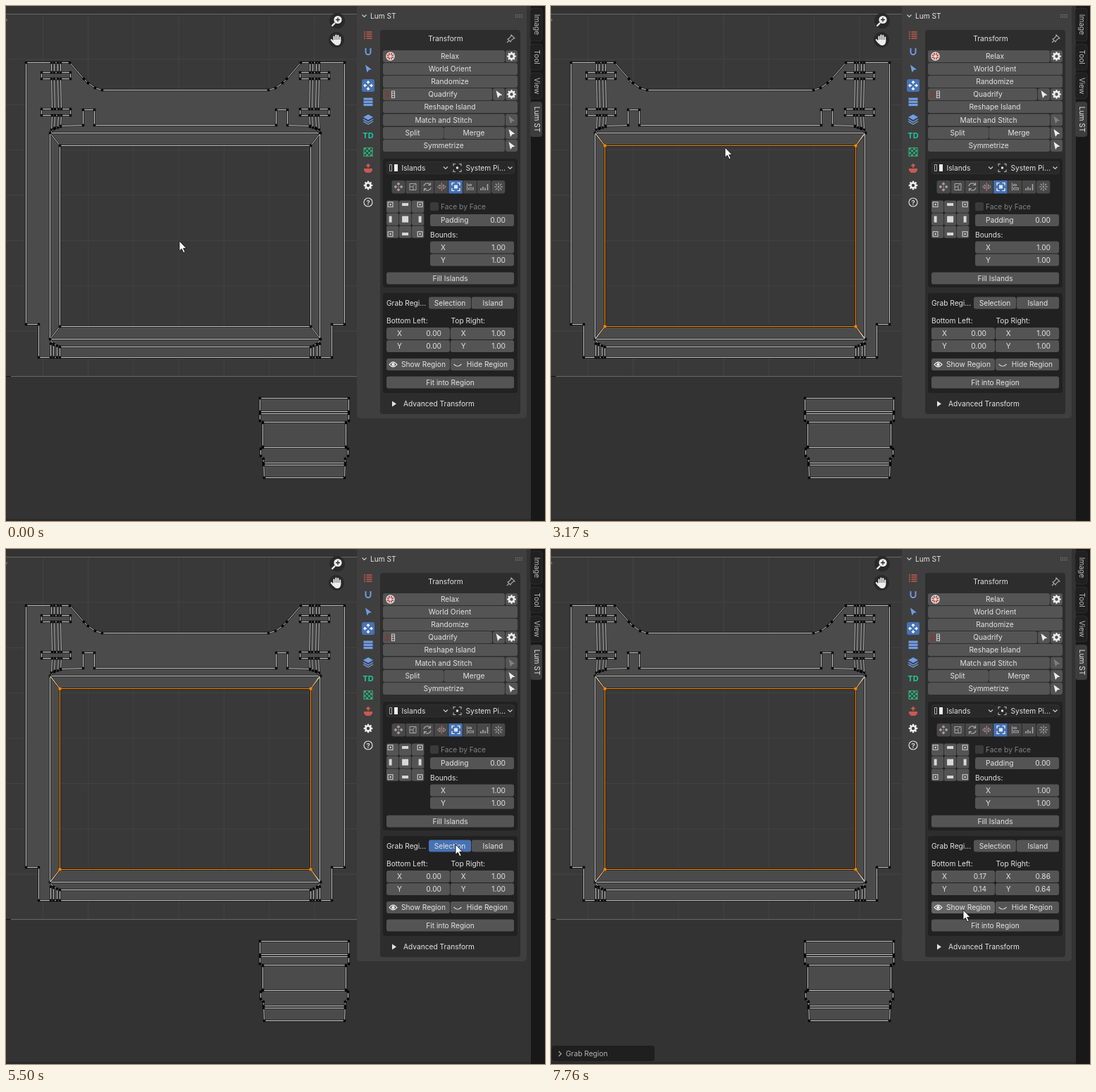
These frames come from a looping animation (765 px wide and 732 px high, 8000 ms). An HTML page:

```html
<!DOCTYPE html>
<html lang="en">
<head>
<meta charset="utf-8">
<title>Grab region</title>
<style>
  html, body { margin: 0; width: 100%; height: 100%; overflow: hidden; background: #333; }
  svg { display: block; width: 765px; height: 732px; }
  text { font: 10.2px Inter, sans-serif; fill: #e4e4e4; white-space: pre; }
</style>
</head>
<body>
<svg id="stage" viewBox="0 0 765 732"></svg>
<script>
const LOOP = 8000;
const BLUE = '#4772b3', BTN = '#545454', HOVER = '#656565', ORANGE = '#f58a0b';
const out = [];
const buttons = [];
const add = s => out.push(s);

const rect = (x, y, w, h, fill, r = 0, extra = '') =>
  add(`<rect x="${x}" y="${y}" width="${w}" height="${h}" rx="${r}" fill="${fill}" ${extra}/>`);
const path = (d, stroke = '#ddd', w = 1, fill = 'none', extra = '') =>
  add(`<path d="${d}" stroke="${stroke}" stroke-width="${w}" fill="${fill}" ${extra}/>`);
const circle = (x, y, r, fill, stroke = 'none', w = 1) =>
  add(`<circle cx="${x}" cy="${y}" r="${r}" fill="${fill}" stroke="${stroke}" stroke-width="${w}"/>`);
const text = (x, y, s, anchor = 'start', extra = '') =>
  add(`<text x="${x}" y="${y + 3.7}" text-anchor="${anchor}" ${extra}>${s}</text>`);
const at = (x, y, draw, k = 1) => {
  add(`<g transform="translate(${x} ${y}) scale(${k})">`);
  draw();
  add('</g>');
};

function button(x, y, w, h, label = '', cx = x + w / 2) {
  buttons.push({ x, y, w, h });
  rect(x, y, w, h, BTN, 3, 'class="btn"');
  if (label) text(cx, y + h / 2, label, 'middle');
}
function field(x, y, w, label, value, id = '') {
  button(x, y, w, 17);
  text(x + 15, y + 8.5, label);
  text(x + w - 12, y + 8.5, value, 'end', id && `id="${id}"`);
}

// Icons, each centred on 0,0
const pointer = fill => () => path('M-4 -5.5L5 1.2L1.2 1.8L-1.5 5.5Z', 'none', 0, fill);
const gear = () => {
  circle(0, 0, 3.5, 'none', '#eee', 2.6);
  for (let a = 0; a < 360; a += 45) path('M0 -4V-6.3', '#eee', 2.3, 'none', `transform="rotate(${a})"`);
};
const cross = (c, r) => path(
  `M0 ${-r}V-2M0 2V${r}M${-r} 0H-2M2 0H${r}` +
  `M-2 ${2 - r}L0 ${-r}L2 ${2 - r}M-2 ${r - 2}L0 ${r}L2 ${r - 2}` +
  `M${2 - r} -2L${-r} 0L${2 - r} 2M${r - 2} -2L${r} 0L${r - 2} 2`, c, 1.3);
const chevron = (x, y, c = '#ccc') => path(`M${x - 3} ${y - 1.5}L${x} ${y + 1.5}L${x + 3} ${y - 1.5}`, c, 1.2);

function canvasArea() {
  rect(0, 0, 765, 732, '#333');
  rect(0, 11, 498, 515, '#393939');
  let d = '';
  for (let i = 0; i < 7; i++) {
    d += `M${(52.4 + i * 64.25).toFixed(1)} 11V526M0 ${(75.8 + i * 64.4).toFixed(1)}H498`;
  }
  path(d, '#444');
  path('M0 11.5H498M0 526.5H498', '#676767');
  path('M0 526.5H7', '#111');
  circle(0, 20, 2, '#666');
  rect(0, 729, 745, 3, '#2b292a');
}

// Wire mesh
let lines = '', dots = '';
function wire(pts, close = false, marks = true) {
  lines += 'M' + pts.map(p => `${p[0] + .5} ${p[1] + .5}`).join('L') + (close ? 'Z' : '');
  if (marks) for (const [x, y] of pts) dots += `M${x - 1.2} ${y - 1.2}h3.4v3.4h-3.4z`;
}
const flip = pts => pts.map(([x, y]) => [508 - x, y]);
const both = (pts, close) => { wire(pts, close); wire(flip(pts), close); };
const box = (x, y, x2, y2) => [[x, y], [x2, y], [x2, y2], [x, y2]];
const mirrored = pts => pts.concat(flip(pts).reverse());
const poly = (pts, fill) =>
  add(`<polygon points="${pts.map(([x, y]) => `${x + .5},${y + .5}`).join(' ')}" fill="${fill}"/>`);

function mesh() {
  const shell = mirrored([[46, 499], [46, 452], [28, 452], [28, 80], [90, 80], [110, 103],
    [116, 109], [126, 116], [136, 119]]);
  poly(shell, '#4b4b4b');
  poly(box(76, 198, 432, 455), '#393939');
  let d = '';
  for (const x of [116.6, 180.9, 245.1, 309.4, 373.6]) d += `M${x} 199V455`;
  for (const y of [204.6, 269, 333.4, 397.8]) d += `M77 ${y}H432`;
  path(d, '#424242');

  wire(shell, true);
  wire(box(62, 180, 445, 473), true);
  wire(box(76, 198, 432, 455), true);
  both([[62, 180], [76, 198]]);
  both([[62, 473], [76, 455]]);
  wire(mirrored([[62, 180], [69, 173], [77, 170], [109, 169], [109, 147], [125, 147], [125, 169]]));
  wire(mirrored([[62, 473], [67, 480], [76, 484]]));
  for (const x of [64, 68, 73, 77]) {
    both([[x, 80], [x, 94]]);
    both([[x, 103], [x + 1, 146]]);
    both([[x + 1, 155], [x, 171 + (77 - x) / 3]]);
    both([[x - 1, 484 - (77 - x) / 3], [x - 1, 499]]);
  }
  both(box(50, 94, 91, 103), true);
  both(box(50, 146, 91, 155), true);

  const part = [[360, 557], [360, 589], [364, 592], [364, 626], [361, 629], [361, 639],
    [365, 643], [366, 670]];
  const right = part.map(([x, y]) => [846 - x, y]).reverse();
  poly(part.concat(right), '#4b4b4b');
  wire(part.concat(right), true);
  for (const [a, y] of [[360, 576], [360, 579], [364, 591], [364, 627], [365, 649], [365, 652]]) {
    wire([[a, y], [846 - a, y]]);
  }

  path(lines, '#000', 2.6, 'none', 'opacity=".5"');
  path(lines, '#c4c4c4');
  path(dots, 'none', 0, '#050505');
}

function selection() {
  add('<g id="sel">');
  const inner = box(76, 198, 432, 455), outer = box(62, 180, 445, 473);
  inner.forEach(([x, y], i) => {
    const [u, v] = outer[i];
    add(`<linearGradient id="g${i}" gradientUnits="userSpaceOnUse" x1="${x}" y1="${y}" x2="${u}" y2="${v}">` +
      `<stop stop-color="${ORANGE}"/><stop offset="1" stop-color="#ddd"/></linearGradient>`);
    path(`M${x + .5} ${y + .5}L${u + .5} ${v + .5}`, `url(#g${i})`, 1.2);
  });
  path('M76.5 198.5H432.5V455.5H76.5Z', '#1a1200', 2.6, 'none', 'opacity=".5"');
  path('M76.5 198.5H432.5V455.5H76.5Z', ORANGE, 1.1);
  for (const [x, y] of inner) rect(x - 1.4, y - 1.4, 3.8, 3.8, ORANGE);
  add('</g>');
}

function navIcons() {
  circle(470, 21, 11, '#292929');
  circle(469, 48, 11, '#292929');
  circle(471, 19.5, 5.6, '#eee');
  path('M467 24L462.5 28.5', '#eee', 2.4);
  path('M471 16.5v6M468 19.5h6', '#292929', 1.4);
  path('M465.5 50V43.5M468.4 49V41.5M471.3 49V42M474.2 50V44.5M465 52L461.8 48', '#eee', 2.1, 'none', 'stroke-linecap="round"');
  path('M464.5 48H475.2V51Q474.5 56 470 56Q466.5 56 464.5 52Z', 'none', 0, '#eee');
}

function sideTabs() {
  rect(745, 0, 20, 732, '#181818');
  const tab = (y, h, s, on) => {
    rect(744, y, 17, h, on ? '#3d3d3d' : '#202020', 4, on ? '' : 'stroke="#2d2d2d"');
    add(`<text transform="translate(749.5 ${y + h / 2}) rotate(90)" text-anchor="middle" ${on ? '' : 'fill-opacity=".8"'}>${s}</text>`);
  };
  tab(3, 47, 'Image');
  tab(54, 37, 'Tool');
  tab(95, 37, 'View');
  tab(136, 50, 'Lum ST', true);
}

function modeIcons() {
  const red = '#c85a50', blue = '#6f9ee8', green = '#2fa877';
  for (let i = 0; i < 4; i++) {
    const y = 37 + i * 3;
    path(`M508 ${y}h2M511.5 ${y}h8`, red, 1.7);
  }
  path('M510.5 60V65.5A3.5 3.5 0 0 0 517.5 65.5V60', blue, 1.9);
  at(514, 89, pointer(blue));
  rect(505, 104, 18, 18, BLUE, 3);
  at(514, 113, () => cross('#fff', 6));
  for (let i = 0; i < 3; i++) rect(507.5, 130.5 + i * 4.2, 13, 3.2, blue);
  path('M507 158L514 154L521 158L514 162Z', 'none', 0, blue);
  path('M507 161L514 165L521 161M507 164L514 168L521 164', blue, 1.4);
  text(514, 184, 'TD', 'middle', 'style="fill:#21c7a0;font-weight:700;font-size:11px"');
  path('M508 201.5h12v12h-12z', green, 1.2);
  for (let i = 0; i < 16; i++) {
    if ((i + (i >> 2)) % 2 === 0) rect(508 + i % 4 * 3, 201.5 + (i >> 2) * 3, 3, 3, green);
  }
  path('M508 231h12v3l-3 3h-6l-3 -3z', 'none', 0, red);
  path('M514 230V225M511.5 227.5L514 225L516.5 227.5', red, 1.8);
  at(514, 255, gear);
  circle(514, 279, 6, 'none', '#ddd', 1.2);
  text(514, 279, '?', 'middle', 'style="font-size:9.5px;font-weight:600"');
}

function toolButtons() {
  text(624, 46, 'Transform', 'middle');
  path('M717 41L722 46L719.5 46.5L716.5 49.5L716 51L712 47L713.5 46.5L716.5 43.5ZM714 49L711 52', '#aaa', 1.1);

  const arrowAt = (x, y, c = '#eee') => { button(x - 8.5, y - 8.5, 17, 17); at(x, y, pointer(c)); };
  const gearAt = y => { button(709, y - 8.5, 17, 17); at(717.5, y, gear); };
  button(535, 63, 173, 17, 'Relax', 630);
  gearAt(71.5);
  circle(545.5, 71.5, 5.6, '#b9544b', '#eee', 1.2);
  path('M540 71.5h11M545.5 66v11M542 68L549 75M549 68L542 75', '#eee', .9);
  button(535, 81, 191, 17, 'World Orient', 630);
  button(535, 99, 191, 17, 'Randomize', 630);
  button(535, 117, 155, 17, 'Quadrify', 620);
  arrowAt(699.5, 125.5);
  gearAt(125.5);
  path('M538 120.5h3q3 0 3 5t-3 5h-3l2 -5z', 'none', 0, '#75413c');
  path('M547.5 121h4v9.5h-4zM547.5 124h4M547.5 127.3h4', '#ccc', 1.1);
  button(535, 135, 191, 17, 'Reshape Island', 630);
  button(535, 153.5, 173, 17, 'Match and Stitch', 621);
  arrowAt(717.5, 162, '#808080');
  button(535, 172, 86, 17, 'Split', 577);
  button(621.5, 172, 86.5, 17, 'Merge', 664);
  arrowAt(717.5, 180.5);
  button(535, 190, 173, 17, 'Symmetrize', 621);
  arrowAt(717.5, 198.5);
}

function transformBox() {
  rect(535, 217, 191, 183, '#212121', 4);
  rect(540, 221.5, 90, 17, '#292929', 3, 'stroke="#343434" stroke-width=".8"');
  rect(631.5, 221.5, 90, 17, '#292929', 3, 'stroke="#343434" stroke-width=".8"');
  path('M544.5 225.5h3v9h-3z', '#aaa');
  rect(551, 225, 5, 10, '#eee');
  text(561.5, 230, 'Islands');
  chevron(624, 230);
  path('M638 224.5h-3v3M643 224.5h3v3M638 235.5h-3v-3M643 235.5h3v-3', '#bbb', 1.1);
  circle(640.5, 230, 1.7, '#eee');
  text(652.5, 230, 'System Pi...');
  chevron(715.5, 230);

  for (let i = 0; i < 8; i++) rect(547.5 + i * 20.2, 248, 19.4, 18.5, i === 4 ? BLUE : '#484848', i % 7 ? 0 : 3);
  const dim = '#a8a8a8';
  at(557, 257, () => { cross(dim, 5.5); circle(0, 0, 1, '#c66'); });
  path('M573 252.5h9v9h-9zM573 257h5v4.5M577 256.5L580.5 253.5', dim);
  path('M593 256A5 5 0 0 1 602 254M603 258A5 5 0 0 1 594 260M602.5 251v3.5h-3.5M593.5 263v-3.5h3.5', dim, 1.2);
  path('M618.3 251v12', '#c76a62', 1.2);
  path('M616 254l-3.5 3l3.5 3zM620.6 254l3.5 3l-3.5 3z', dim, .9);
  path('M633 255v-3.5h3.5M640.5 251.5h3.5v3.5M633 259v3.5h3.5M640.5 262.5h3.5v-3.5', '#fff', 1.2);
  rect(636, 254.5, 5, 5, '#dce7fa');
  path('M654.5 251.5v11M656.5 253.5h4v2h-4zM656.5 258.5h7v2.5h-7z', dim);
  path('M674 262v-3M677 262v-5M680 262v-3.5M683.5 262v-9', dim, 1.6);
  at(699, 257, () => {
    for (let a = 0; a < 360; a += 45) path('M0 -2.5V-6', dim, 1.1, 'none', `transform="rotate(${a})"`);
    circle(0, 0, 1.2, dim);
  });

  for (let i = 0; i < 9; i++) {
    const cx = i % 3, cy = i / 3 | 0, x = 540 + cx * 18, y = 276.5 + cy * 18;
    rect(x, y, 17.3, 17.3, BTN, 2);
    const mx = x + 8.6 + (cx - 1) * 3, my = y + 8.6 + (cy - 1) * 3;
    if (i === 4) rect(mx - 4.5, my - 4.5, 9, 9, '#d8d8d8');
    else if (i % 2) rect(mx - (cx === 1 ? 4.5 : 2), my - (cy === 1 ? 4.5 : 2), cx === 1 ? 9 : 4, cy === 1 ? 9 : 4, '#d8d8d8');
    else {
      rect(mx - 4, my - 4, 8, 8, '#bdbdbd');
      path(`M${mx - 2} ${my - 2}h4v4h-4z`, '#383838', 1.2);
    }
  }

  rect(602, 279, 12, 12, '#3a3a3a', 2);
  text(617, 285, 'Face by Face', 'start', 'style="fill:#838383"');
  field(602, 296, 119, 'Padding', '0.00');
  text(602, 325, 'Bounds:');
  field(602, 334.5, 119, 'X', '1.00');
  field(602, 352.5, 119, 'Y', '1.00');
  button(540, 378.5, 181, 17, 'Fill Islands');
}

function regionBox() {
  rect(535, 408, 191, 142, '#212121', 4);
  text(540, 422, 'Grab Regi...');
  button(600, 413.5, 60, 17, 'Selection');
  grab = buttons.length - 1;
  button(660.8, 413.5, 60.2, 17, 'Island');
  text(540, 447.5, 'Bottom Left:');
  text(631.5, 447.5, 'Top Right:');
  field(540, 457, 90, 'X', '', 'v0');
  field(630.8, 457, 90.2, 'X', '', 'v1');
  field(540, 475, 90, 'Y', '', 'v2');
  field(630.8, 475, 90.2, 'Y', '', 'v3');
  button(540, 501, 90, 17, 'Show Region', 592.5);
  path('M544 509.7Q549.5 502.5 555 509.7Q549.5 516 544 509.7Z', '#eee', 1.2);
  circle(549.5, 509.5, 2.2, '#eee');
  button(630.8, 501, 90.2, 17, 'Hide Region', 683);
  path('M635.5 509Q641 515 646.5 509', '#ccc', 1.2);
  button(540, 526.5, 181, 17, 'Fit into Region');
  path('M548 561.5L554 565.5L548 569.5Z', 'none', 0, '#e4e4e4');
  text(564, 565.5, 'Advanced Transform');
}

function sidePanel() {
  rect(498, -6, 241, 592, '#3f3f3f', 5);
  chevron(508.5, 14);
  text(517, 14, 'Lum ST');
  for (let i = 0; i < 8; i++) rect(723 + (i % 4) * 2.8, 12 + (i >> 2) * 3, 1.3, 1.3, '#888');
  rect(531, 34, 199, 546, '#2d2d2d', 4);
  modeIcons();
  toolButtons();
  transformBox();
  regionBox();
}

function operatorPanel() {
  add('<g id="op">');
  rect(1, 706, 146, 22, '#1f1f1f', 4);
  path('M11 714L14.5 717.5L11 721', '#aaa', 1.2);
  text(21, 717.5, 'Grab Region', 'start', 'style="fill:#b4b4b4"');
  add('</g>');
}

let grab;
canvasArea();
mesh();
selection();
navIcons();
sidePanel();
sideTabs();
operatorPanel();
path('M0 0V14.2L3.3 11.2L5.9 16.8L8.2 15.7L5.7 10.4H10Z', '#111', .9, '#fff', 'id="cursor"');

const stage = document.getElementById('stage');
stage.innerHTML = out.join('');
const $ = id => document.getElementById(id);
const faces = [...stage.querySelectorAll('.btn')];
const values = [0, 1, 2, 3].map(i => $('v' + i));
const before = ['0.00', '1.00', '0.00', '1.00'];
const after = ['0.17', '0.86', '0.14', '0.64'];

// Pointer path: time, x, y
const keys = [
  [0, 246, 334], [161, 246, 334], [500, 241, 264], [790, 244, 202],
  [3091, 244, 202], [3170, 247, 201], [3560, 420, 252], [3960, 586, 341], [4040, 602, 351],
  [4560, 654, 403], [4800, 645, 417], [4960, 638, 420], [6730, 638, 420], [6810, 630, 425],
  [7200, 603, 476], [7600, 590, 517], [7760, 585, 513], [LOOP, 585, 513]
];
// The picture advances in steps: start, end, count
const runs = [[240, 790, 8], [3170, 3960, 11], [4040, 4800, 11], [4880, 4960, 2], [6810, 7600, 11], [7680, 7760, 2]];

function stepTime(t) {
  let last = 0;
  for (const [a, b, n] of runs) {
    if (t < a) break;
    const gap = (b - a) / (n - 1);
    last = a + Math.min(n - 1, Math.floor((t - a + 4) / gap)) * gap;
  }
  return last;
}
const slope = (i, c) => (keys[i + 1][c] - keys[i][c]) / (keys[i + 1][0] - keys[i][0]);
function tangent(i, c) {
  if (i === 0 || i === keys.length - 1) return 0;
  const a = slope(i - 1, c), b = slope(i, c);
  return a * b <= 0 ? 0 : 2 * a * b / (a + b);
}
function pointAt(t) {
  let i = 0;
  while (i < keys.length - 2 && keys[i + 1][0] <= t) i++;
  const h = keys[i + 1][0] - keys[i][0], u = (t - keys[i][0]) / h, v = 1 - u;
  return [1, 2].map(c =>
    v * v * (1 + 2 * u) * keys[i][c] + u * u * (3 - 2 * u) * keys[i + 1][c] +
    h * u * v * (v * tangent(i, c) - u * tangent(i + 1, c)));
}

function render(t) {
  const [x, y] = pointAt(stepTime(t));
  $('cursor').setAttribute('transform', `translate(${x.toFixed(2)} ${y.toFixed(2)})`);
  buttons.forEach((b, i) => {
    const over = x > b.x + .1 && x < b.x + b.w && y > b.y && y < b.y + b.h;
    const pressed = i === grab && t >= 5500 && t < 5810;
    faces[i].setAttribute('fill', pressed ? BLUE : over ? HOVER : BTN);
  });
  const done = t >= 5810;
  values.forEach((v, i) => { v.textContent = (done ? after : before)[i]; });
  $('sel').style.display = t >= 1020 ? '' : 'none';
  $('op').style.display = done ? '' : 'none';
}

const start = performance.now();
function loop() {
  render((performance.now() - start) % LOOP);
  requestAnimationFrame(loop);
}
loop();
</script>
</body>
</html>
```
